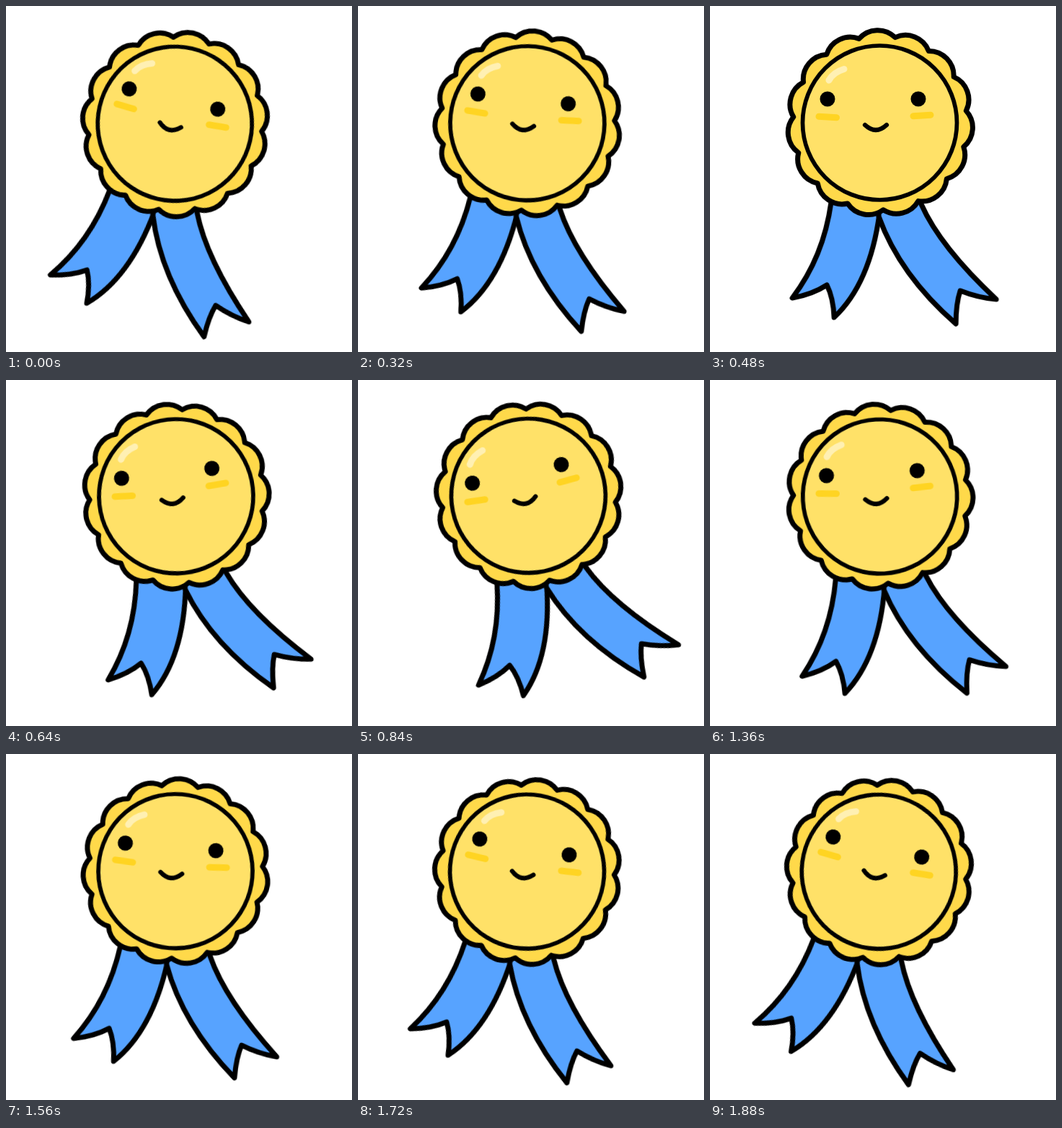
Animation of 480x480 px, one loop 1.92 s. Source, as an HTML page without scripts:

```html
<!DOCTYPE html>
<html lang="en">
<head>
<meta charset="utf-8">
<title>Swinging rosette</title>
<style>
  html, body { margin: 0; width: 100%; height: 100%; overflow: hidden; background: #fff; }
  svg { display: block; width: 100%; height: 100%; }
  .rosette {
    transform-origin: 229px 157px;
    animation: swing 960ms cubic-bezier(.333, 0, .667, 1) infinite alternate;
  }
  @keyframes swing {
    from { transform: rotate(12.9deg); }
    to { transform: rotate(-12.9deg); }
  }
  .line { stroke: #000; stroke-width: 5.7; stroke-linejoin: round; stroke-linecap: round; }
  .edge { stroke-width: 7; }
  .ribbon { fill: #57a3ff; }
  .rim { fill: #ffd94a; }
  .disc { fill: #ffe168; }
  .soft { fill: none; stroke-width: 9; stroke-linecap: round; }
  .blush { stroke: #ffd422; }
  .shine { stroke: #fff0b3; }
  .smile { fill: none; stroke-width: 6.2; }
</style>
</head>
<body>
<svg viewBox="0 0 480 480">
  <g class="rosette">
    <g class="ribbon line edge">
      <path d="M170 255 L168 272 Q157.5 348 114 405 Q142 400 162 387 Q171 405 172 432 Q222 385 235 288 L237 255 Z"/>
      <path d="M235 260 L234 292 Q263 373 341 441 Q341 413 347 395 Q372 405 397 407 Q319 334 293 275 L286 255 Z"/>
    </g>

    <path class="rim line edge" transform="translate(236 162.3)" d="M-29.2 -116.9
      A34.5 34.5 0 0 1 20.9 -118.7 A34.5 34.5 0 0 1 67.4 -99.9 A34.5 34.5 0 0 1 102.2 -63.9
      A34.5 34.5 0 0 1 119.3 -16.8 A34.5 34.5 0 0 1 115.8 33.2 A34.5 34.5 0 0 1 92.3 77.5
      A34.5 34.5 0 0 1 52.8 108.3 A34.5 34.5 0 0 1 4.2 120.4 A34.5 34.5 0 0 1 -45.1 111.7
      A34.5 34.5 0 0 1 -86.7 83.7 A34.5 34.5 0 0 1 -113.2 41.2 A34.5 34.5 0 0 1 -120.2 -8.4
      A34.5 34.5 0 0 1 -106.4 -56.6 A34.5 34.5 0 0 1 -74.2 -95 A34.5 34.5 0 0 1 -29.2 -116.9 Z"/>
    <circle class="disc line" cx="235.5" cy="162" r="107"/>

    <path class="soft shine" d="M165 103 Q171 92 186 87.5"/>
    <path class="soft blush" d="M151 153.2 L175.5 154.8 M282 152.8 L306 151.2"/>
    <circle cx="163" cy="129" r="10.5"/>
    <circle cx="289" cy="129" r="10.5"/>
    <path class="line smile" d="M215 165 Q230 179 245 165"/>
  </g>
</svg>
</body>
</html>
```
